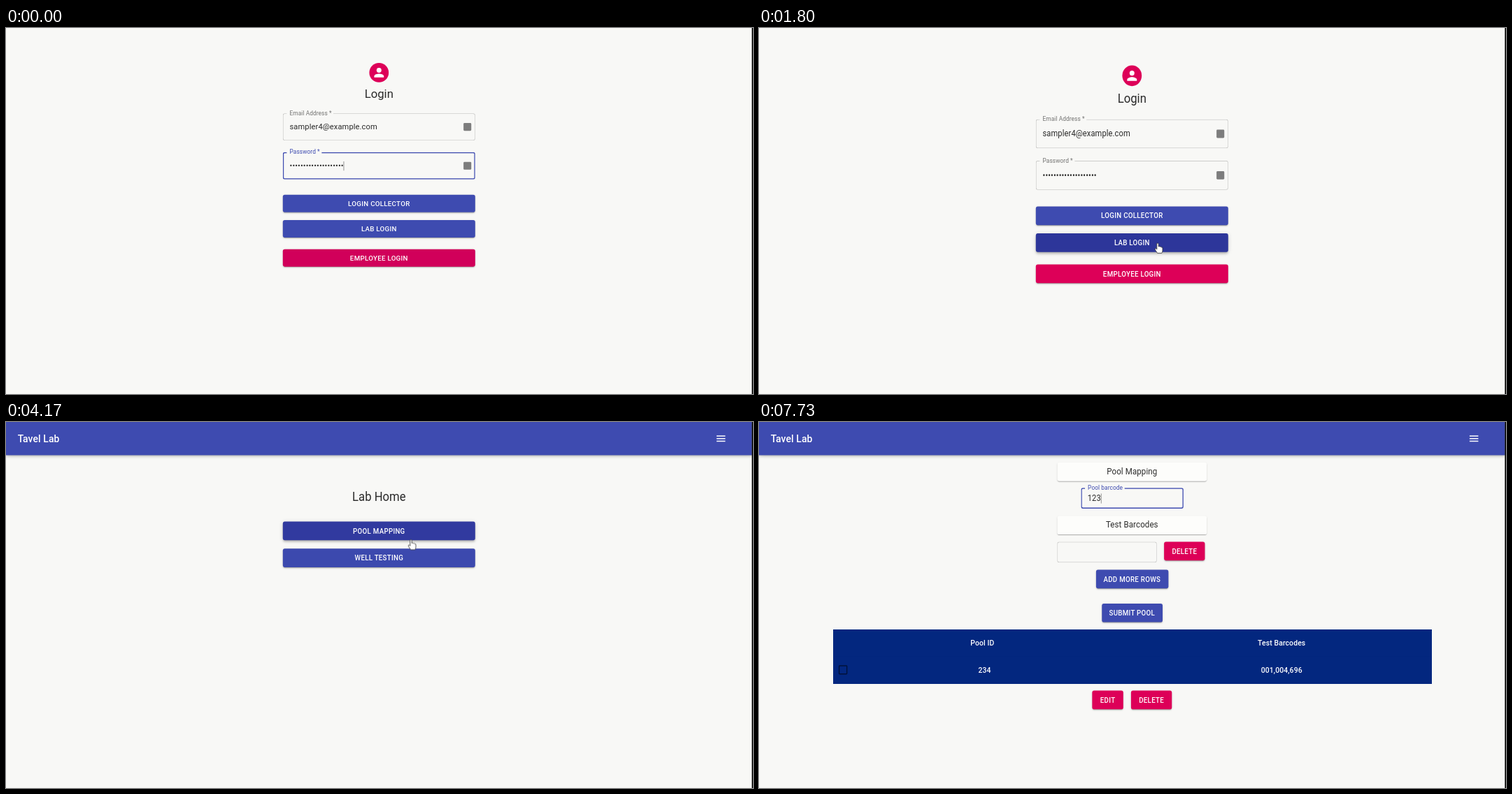
Recreate the animation shown at these times as an HTML page. Size 1068 px wide and 524 px high, loop 8 s.

```html
<!DOCTYPE html>
<html lang="en">
<head>
<meta charset="utf-8">
<title>Lab login and pool mapping</title>
<style>
:root {
  --bg: #f8f8f6; --blue: #3e4bb0; --dark: #2d369a; --pink: #dd0058; --loop: 8s infinite;
  --flat: 0 3px 1px -2px #0003, 0 2px 2px #00000024, 0 1px 5px #0000001f;
  --raised: 0 2px 4px -1px #0003, 0 4px 5px #00000024, 0 1px 10px #0000001f;
  --pressed: 0 5px 5px -3px #0003, 0 8px 10px 1px #00000024, 0 3px 14px 2px #0000001f;
  --line: inset 0 0 0 1px #0000003b; --focus: inset 0 0 0 2px var(--blue);
}
html, body { margin: 0; width: 100%; height: 100%; overflow: hidden; background: var(--bg); }
body { position: relative; font: 16px/1 Roboto, sans-serif; letter-spacing: .00938em; color: #000000d4; }

/* The page is laid out at 1536px wide; the viewport height changes once. */
#page { position: absolute; left: 0; top: 0; width: 1536px; height: 760px; transform-origin: 0 0;
  transform: scale(.6944, .7425); animation: resize var(--loop); }
.scene, #page * { position: absolute; }
.scene { inset: 0; }
.edge { position: absolute; left: 1067px; top: 0; width: 1px; height: 100%; background: #000; box-shadow: -1px 0 #0009; }

.h5 { left: 0; width: 1536px; text-align: center; font-size: 24px; line-height: 32px; letter-spacing: 0; }
.btn { height: 36px; border-radius: 4px; background: var(--blue); color: #fff; text-align: center; overflow: hidden;
  font-size: 14px; font-weight: 500; line-height: 36px; letter-spacing: .02857em; box-shadow: var(--flat); }
.wide { left: 570px; width: 396px; }
.pink { background: var(--pink); }
.field { border-radius: 4px; box-shadow: var(--line); white-space: nowrap; }
.big { left: 570px; width: 396px; height: 56px; }
.small { height: 40px; }
.field label { left: 0; top: 0; padding: 0 5px 0 8px; background: var(--bg); color: #0000008a;
  transform-origin: 0 0; transform: translate(8px, -6px) scale(.75); }
.value { left: 14px; top: 50%; line-height: 20px; margin-top: -10px; }
#page .value span { position: static; }
.badge { right: 8px; top: 20px; width: 16px; height: 16px; border-radius: 2px; background: #7d7d7d; }
.caret { width: 1.4px; height: 19px; top: 50%; margin-top: -9.5px; background: #666; }
.avatar { left: 748px; top: 72px; width: 40px; height: 40px; border-radius: 50%; background: var(--pink); }
.avatar svg { left: 5px; top: 5px; }

.bar { left: 0; top: 0; width: 1536px; height: 64px; background: var(--blue); color: #fff; box-shadow: var(--raised); }
.bar b { left: 24px; font-size: 20px; font-weight: 500; line-height: 64px; letter-spacing: .0075em; }
.bar i { left: 1463px; width: 18px; height: 2px; background: #fff; }
.card { left: 614px; width: 308px; height: 36px; border-radius: 4px; background: #fdfdfb; text-align: center;
  font-size: 16.6px; line-height: 36px;
  box-shadow: 0 2px 1px -1px #0003, 0 1px 1px #00000024, 0 1px 3px #0000001f; }
.row { left: 152.5px; width: 1231.5px; height: 52px; background: #03277f; color: #fff; font-size: 15px; font-weight: 500;
  line-height: 52px; text-align: center; }
.row span { width: 200px; }
.box { left: 11.5px; top: 17px; width: 14px; height: 14px; border: 2px solid #0000008a; border-radius: 2px; }

/* Scenes */
.login { animation: login var(--loop) step-end; }
.bar { animation: inside var(--loop) step-end; }
.home { animation: home var(--loop) step-end; }
.pool { animation: pool var(--loop) step-end; }
.data { animation: data var(--loop) step-end; }
.actions { animation: shift var(--loop) step-end; }
@keyframes resize { 0%, .375% { transform: scale(.6944); animation-timing-function: ease-out } 2.875% { transform: scale(.6944, .7425) } }
@keyframes login { 0% { opacity: 1 } 31.25%, 100% { opacity: 0 } }
@keyframes inside { 0% { opacity: 0 } 31.25%, 100% { opacity: 1 } }
@keyframes home { 0% { opacity: 0 } 31.25% { opacity: 1 } 64.375%, 100% { opacity: 0 } }
@keyframes pool { 0% { opacity: 0 } 64.375%, 100% { opacity: 1 } }
@keyframes data { 0% { opacity: 0 } 67.125%, 100% { opacity: 1 } }
@keyframes shift { 0% { transform: translateY(-52px) } 67.125%, 100% { transform: none } }

/* Button states */
.employee { animation: employee var(--loop); }
.lab { animation: lab var(--loop); }
.well { animation: well var(--loop); }
.mapping { animation: mapping var(--loop); }
@keyframes employee { 0%, .375% { background: #d1005a } 2.875% { background: var(--pink) } }
@keyframes lab {
  0%, 10% { background: var(--blue); box-shadow: var(--flat) }
  13% { background: var(--dark); box-shadow: var(--raised) }
  15.625% { background: var(--dark); box-shadow: var(--pressed) }
  18.75%, 100% { background: var(--dark); box-shadow: var(--raised) }
}
@keyframes well {
  0%, 43.19%, 53.375%, 100% { background: var(--blue); box-shadow: var(--flat) }
  46.31%, 50.25% { background: var(--dark); box-shadow: var(--raised) }
}
@keyframes mapping {
  0%, 50.625% { background: var(--blue); box-shadow: var(--flat) }
  53.75%, 59.69% { background: var(--dark); box-shadow: var(--raised) }
  62.81%, 100% { background: var(--dark); box-shadow: var(--pressed) }
}
.ripple { width: 530px; height: 530px; margin: -265px; border-radius: 50%; background: #fff; opacity: 0; }
.lab .ripple { left: 250px; top: 18px; animation: grow1 var(--loop), fade1 var(--loop); }
.mapping .ripple { left: 263px; top: 35px; animation: grow2 var(--loop), fade2 var(--loop); }
@keyframes grow1 { 0%, 13% { transform: scale(0); animation-timing-function: cubic-bezier(.4, 0, .2, 1) } 19.875%, 100% { transform: scale(1) } }
@keyframes fade1 { 0%, 13% { opacity: .1 } 15.625% { opacity: .25 } 22.5%, 100% { opacity: 0 } }
@keyframes grow2 { 0%, 59.69% { transform: scale(0); animation-timing-function: cubic-bezier(.4, 0, .2, 1) } 66.56%, 100% { transform: scale(1) } }
@keyframes fade2 { 0%, 59.69% { opacity: .1; animation-timing-function: cubic-bezier(.4, 0, .2, 1) } 66.56%, 100% { opacity: .3 } }

/* Field focus and typing */
.password { animation: blur var(--loop) step-end; }
.password label { animation: greyLabel var(--loop); }
.password .caret { left: 125px; animation: caretOff var(--loop) step-end; }
.barcode { animation: focus var(--loop) step-end; }
.barcode label { animation: float var(--loop); }
.barcode .caret { left: 14px; animation: blink var(--loop) step-end, advance var(--loop) step-end; }
.d1 { animation: type1 var(--loop) step-end; }
.d2 { animation: type2 var(--loop) step-end; }
.d3 { animation: type3 var(--loop) step-end; }
@keyframes blur { 0% { box-shadow: var(--focus) } 13%, 100% { box-shadow: var(--line) } }
@keyframes greyLabel { 0%, 13% { color: var(--blue) } 15.5%, 100% { color: #0000008a } }
@keyframes caretOff { 0% { opacity: 1 } 13%, 100% { opacity: 0 } }
@keyframes focus { 0% { box-shadow: var(--line) } 77.5%, 100% { box-shadow: var(--focus) } }
@keyframes float {
  0%, 77.5% { transform: translate(6px, 12px); color: #0000008a; animation-timing-function: cubic-bezier(0, 0, .2, 1) }
  80%, 100% { transform: translate(8px, -6px) scale(.75); color: var(--blue) }
}
@keyframes blink { 0% { opacity: 0 } 77.5% { opacity: 1 } 83.75% { opacity: 0 } 90%, 100% { opacity: 1 } }
@keyframes advance { 0% { left: 14px } 94.625% { left: 23px } 95.625% { left: 32px } 96.625%, 100% { left: 41px } }
@keyframes type1 { 0% { opacity: 0 } 94.625%, 100% { opacity: 1 } }
@keyframes type2 { 0% { opacity: 0 } 95.625%, 100% { opacity: 1 } }
@keyframes type3 { 0% { opacity: 0 } 96.625%, 100% { opacity: 1 } }

/* Pointer: the group's origin is the hot spot */
.pointer { position: absolute; left: 0; top: 0; width: 1px; height: 1px; overflow: visible; animation: move var(--loop); }
.pointer path { stroke-linejoin: round; }
.hand { animation: hand var(--loop) step-end; }
.arrow { animation: arrow var(--loop) step-end; }
.beam { animation: beam var(--loop) step-end; }
@keyframes move {
  0%, 5% { transform: translate(600px, 352px); animation-timing-function: ease-out }
  10%, 40.375% { transform: translate(570px, 308px) }
  43.375% { transform: translate(560px, 201px); animation-timing-function: ease-out }
  46.625%, 50% { transform: translate(566px, 192px) }
  51%, 69.625% { transform: translate(579px, 168.5px) }
  71.625% { transform: translate(529px, 157px); animation-timing-function: ease-out }
  76.25%, 100% { transform: translate(480px, 108px) }
}
@keyframes hand { 0% { opacity: 0 } 5% { opacity: 1 } 32.875% { opacity: 0 } 43.1% { opacity: 1 } 64.375%, 100% { opacity: 0 } }
@keyframes arrow { 0% { opacity: 0 } 32.875% { opacity: 1 } 43.1% { opacity: 0 } 64.375% { opacity: 1 } 73.5%, 100% { opacity: 0 } }
@keyframes beam { 0% { opacity: 0 } 73.5% { opacity: 1 } 94.625%, 100% { opacity: 0 } }
</style>
</head>
<body>
<div id="page">
  <div class="scene login">
    <div class="avatar"><svg width="30" height="30" viewBox="0 0 24 24" fill="#fff"><circle cx="12" cy="8" r="4"/><path d="M12 14c-2.7 0-8 1.3-8 4v2h16v-2c0-2.7-5.3-4-8-4z"/></svg></div>
    <div class="h5" style="top:120px">Login</div>
    <div class="field big" style="top:176px"><label>Email Address *</label><div class="value">sampler4@example.com</div><i class="badge"></i></div>
    <div class="field big password" style="top:256px"><label>Password *</label><div class="value">••••••••••••••••••••</div><i class="caret"></i><i class="badge"></i></div>
    <div class="btn wide" style="top:344px">LOGIN COLLECTOR</div>
    <div class="btn wide lab" style="top:396px">LAB LOGIN<i class="ripple"></i></div>
    <div class="btn wide pink employee" style="top:456px">EMPLOYEE LOGIN</div>
  </div>

  <div class="scene home">
    <div class="h5" style="top:128px">Lab Home</div>
    <div class="btn wide mapping" style="top:192px">POOL MAPPING<i class="ripple"></i></div>
    <div class="btn wide well" style="top:244px">WELL TESTING</div>
  </div>

  <div class="scene pool">
    <div class="card" style="top:78px">Pool Mapping</div>
    <div class="field small barcode" style="left:662.5px;top:127px;width:211px">
      <label>Pool barcode</label>
      <div class="value"><span class="d1">1</span><span class="d2">2</span><span class="d3">3</span></div>
      <i class="caret"></i>
    </div>
    <div class="card" style="top:181px">Test Barcodes</div>
    <div class="field small" style="left:614px;top:231px;width:205px"></div>
    <div class="btn pink" style="left:834px;top:230.5px;width:84px">DELETE</div>
    <div class="btn" style="left:693.5px;top:285px;width:149px">ADD MORE ROWS</div>
    <div class="btn" style="left:705.5px;top:349.5px;width:125px">SUBMIT POOL</div>
    <div class="row" style="top:400px"><span style="left:207.5px">Pool ID</span><span style="left:823.5px">Test Barcodes</span></div>
    <div class="row data" style="top:452px"><i class="box"></i><span style="left:212px">234</span><span style="left:823.5px">001,004,696</span></div>
    <div class="scene actions">
      <div class="btn pink" style="left:686px;top:517.5px;width:64px">EDIT</div>
      <div class="btn pink" style="left:766px;top:517.5px;width:84px">DELETE</div>
    </div>
  </div>

  <div class="bar"><b>Tavel Lab</b><i style="top:26px"></i><i style="top:31px"></i><i style="top:36px"></i></div>
</div>

<svg class="pointer">
  <path class="hand" fill="#fff" stroke="#333" stroke-width=".8" d="M-1.2 .6Q0-.8 1.2 .6V5Q2.4 4 3.4 5.3 4.6 4.6 5.4 6 7 5.6 7 7.2V10.5Q7 12.5 5.8 14.3H-.4Q-1.6 12.4-3.6 9.4-4.4 7.4-2.6 7.6L-1.2 9Z"/>
  <path class="arrow" fill="#fff" stroke="#333" stroke-width=".8" d="M.3 .3V11.8L2.8 9.5 4.6 13.6 6.3 12.9 4.6 8.9H7.4Z"/>
  <path class="beam" fill="none" stroke="#333" stroke-width=".8" d="M-2.5-6H-.6L0-5.4 .6-6H2.5M0-5.4V6.4M-2.5 7H-.6L0 6.4 .6 7H2.5"/>
</svg>
<div class="edge"></div>
</body>
</html>
```
